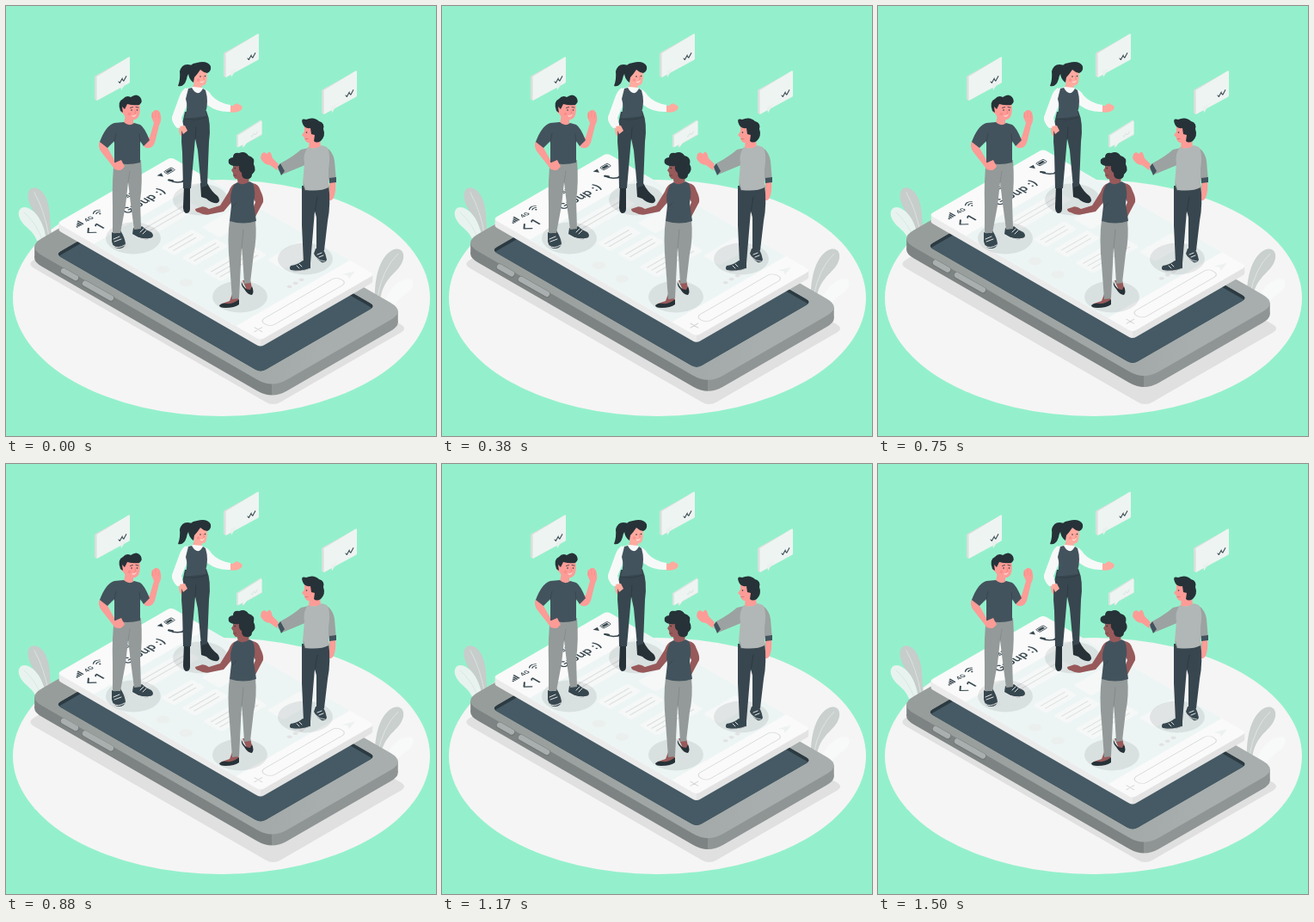
Recreate the animation shown at these times as an HTML page. Size 500 by 500 pixels, loop 1540 ms.

```html
<!DOCTYPE html>
<html lang="en">
<head>
<meta charset="utf-8">
<title>Group chat</title>
<style>
html, body { margin: 0; width: 100%; height: 100%; overflow: hidden; background: #94f0cc; }
svg { display: block; width: 100%; height: 100%; }
text { font-family: Inter, "Open Sans", sans-serif; fill: #37474f; }
.skin { fill: #fd9c97; }
.peach { fill: #ffaa9f; }
.brown { fill: #98595a; }
.top { fill: #43535d; }
.slacks { fill: #38464f; }
.grey { fill: #939a99; }
.pale { fill: #b1b7b6; }
.sleeve { fill: #9ca2a1; }
.ink { fill: #263238; }
.shoe { fill: #37474f; }
.white { fill: #f7f9f9; }
.line { fill: none; stroke-linecap: round; stroke-linejoin: round; }
</style>
</head>
<body>
<svg id="stage" viewBox="0 0 500 500" xmlns="http://www.w3.org/2000/svg"></svg>
<script>
const LOOP = 1540, RISE = 9.6;
const UX = 0.866, UY = 0.5;

// Rounded slab lying flat in isometric view; w runs up-right, l runs down-right.
function outline(x, y, w, l, r) {
  const at = (a, b) => (x + UX * (a + b)).toFixed(1) + ',' + (y + UY * (b - a)).toFixed(1);
  return `M${at(r, 0)}L${at(w - r, 0)}Q${at(w, 0)} ${at(w, r)}L${at(w, l - r)}Q${at(w, l)} ${at(w - r, l)}` +
    `L${at(r, l)}Q${at(0, l)} ${at(0, l - r)}L${at(0, r)}Q${at(0, 0)} ${at(r, 0)}Z`;
}

function slab(id, x, y, w, l, r, depth, face, left, right) {
  const d = outline(x, y, w, l, r), inset = r * 0.433;
  const x1 = x + inset, x2 = x + UX * (w + l) - inset;
  const y2 = y + UY * (l - w), split = (UX * l - inset) / (x2 - x1);
  return `<linearGradient id="${id}" gradientUnits="userSpaceOnUse" x1="${x1}" y1="0" x2="${x2}" y2="0">
      <stop offset="${split}" stop-color="${left}"/><stop offset="${split}" stop-color="${right}"/></linearGradient>
    <g fill="url(#${id})"><path d="${d}" transform="translate(0 ${depth})"/>
    <path d="M${x1},${y}L${x2},${y2}v${depth}L${x1},${y + depth}Z"/></g>
    <path d="${d}" fill="${face}"/>`;
}

const shape = (cls, d) => `<path class="${cls}" d="${d}"/>`;
const fill = (color, d) => `<path fill="${color}" d="${d}"/>`;
const stroke = (d, color, width) => `<path class="line" d="${d}" stroke="${color}" stroke-width="${width}"/>`;
const shade = (x, y) => `<ellipse cx="${x}" cy="${y}" rx="32" ry="18.5" fill="#263238" opacity=".1"/>`;
const eye = (x, y) => `<circle cx="${x}" cy="${y}" r=".8" class="ink"/>`;
const blush = (x, y) => `<circle cx="${x}" cy="${y}" r="1.7" fill="#f47c7b" opacity=".5"/>`;

function phone() {
  const screen = y => outline(57.5, y, 154.5, 275.5, 7);
  return `<linearGradient id="rim"><stop offset=".1" stop-color="#979d9b"/><stop offset=".8" stop-color="#a7aead"/></linearGradient>` +
    slab('body', 24.5, 280, 179, 329, 20, 13, 'url(#rim)', '#7d8382', '#8f9594') +
    `<clipPath id="hole"><path d="${screen(288.5)}"/></clipPath>
    <g clip-path="url(#hole)"><path d="${screen(288.5)}" fill="#2c3a42"/><path d="${screen(293)}" fill="#455a64"/></g>` +
    stroke('M67,308.5L81,316.5M92,323L122,340', '#727877', 8) +
    stroke('M67,308L81,316M92,322.5L122,339.5', '#a9afae', 6.4);
}

function bubble(a, b, w, h, lines) {
  let s = `<rect x="${a}" y="${b}" width="${w}" height="${h}" rx="3" fill="#f6f8f8"/>`;
  for (let i = 0; i < lines; i++) {
    s += stroke(`M${a + 5},${b + 6 + i * 6}h${w - (i === lines - 1 ? 12 : 10)}`, '#dfe1e1', 1.3);
  }
  return s;
}

function panel() {
  const ink = '#37474f';
  const bars = [0, 1, 2, 3].map(i =>
    `<rect x="${8 + i * 2.4}" y="${17 - i * 1.9}" width="1.7" height="${2 + i * 1.9}" fill="${ink}"/>`).join('');
  return slab('card', 59.5, 252.3, 153, 273, 5, 8, '#fafafa', '#ebebeb', '#e3e3e3') +
    `<g transform="matrix(${UX} ${-UY} ${UX} ${UY} 59.5 252.3)">
      <rect y="49" width="153" height="191" fill="#edf5f4"/>` +
      bars +
      `<text x="21" y="19" font-size="7" font-weight="600">4G</text>` +
      stroke('M35,13.5q4.5,-4 9,0M36.8,15.7q2.7,-2.2 5.4,0', ink, 1.1) +
      `<circle cx="39.5" cy="18" r="1" fill="${ink}"/>
      <text x="66" y="19" font-size="7.5" font-weight="600">12:45</text>
      <path d="M122,12h6l-3,5.5Z" fill="${ink}"/>
      <rect x="131" y="12" width="10" height="5.5" rx="1.2" fill="none" stroke="${ink}" stroke-width=".8"/>
      <rect x="132.2" y="13.2" width="7" height="3.1" fill="${ink}"/>` +
      stroke('M15,27l-5.5,5l5.5,5', ink, 1.6) +
      `<text x="21" y="37.5" font-size="14.5" font-weight="600">1</text>
      <text x="57" y="37" font-size="13.6" font-weight="600">Group :)</text>` +
      stroke('M125,25q0,10 11,12', ink, 2) + stroke('M125,25.5l1.5,2.5M133.5,36l2.5,1', ink, 3) +
      bubble(43, 59, 70, 19, 2) + bubble(41, 98, 42, 18, 2) + bubble(43, 124, 45, 18, 2) +
      bubble(42, 154, 62, 24, 3) + bubble(92, 102, 50, 24, 0) + bubble(98, 184, 44, 22, 0) +
      [70, 125, 156].map(b => `<circle cx="17" cy="${b}" r="6.5" fill="#ebf0ef"/>`).join('') +
      [82, 90, 98].map(a => `<circle cx="${a}" cy="230" r="2.4" fill="#e3e2e2"/>`).join('') +
      stroke('M6,259h10M11,254v10', '#d5d7d7', 1.2) +
      `<rect x="22" y="250" width="103" height="14" rx="6" fill="#fafafa" stroke="#d9dbdb"/>
      <path d="M131,251l13,5l-13,5l3,-5Z" fill="#edf2f1"/>
    </g>`;
}

function leaves() {
  return fill('#c6cdcb', 'M54,270C50,256 53,237 47,224C43,214 35,209 29,212C24,216 25,224 28,231C33,244 43,247 47,272Z') +
    stroke('M33,217Q45,238 50,268', '#e2e7e5', 0.8) +
    fill('#e8f3ef', 'M47,275C46,256 36,236 22,234C14,234 13,242 17,249C22,258 31,260 36,273Z') +
    stroke('M21,240Q35,252 42,271', '#cfe2db', 0.7) +
    fill('#f8f9f9', 'M440,345C446,327 458,317 470,317C477,320 473,330 466,334C456,340 454,346 450,350Z') +
    fill('#c9d0ce', 'M429,342C428,318 434,292 449,284C459,279 465,287 461,297C456,311 439,314 435,342Z') +
    stroke('M456,288Q438,305 432,338', '#e6e9e8', 0.8);
}

function speech(x, y, tail) {
  return `<g transform="translate(${x} ${y})">
    <path d="M0,23l2,-1.5L41,0l-1,30L3,51l-3,-1.5Z" fill="#d9dfdd"/>
    <path d="M2.5,23L39,.8q2,-1 2,1V29q0,1 -1,1.7L2.5,51Z" fill="#eef4f2"/>
    <path d="M0,-3L1,4L8,-7Z" fill="#eaf0ee" transform="translate(${tail} ${51 - tail * 0.53})"/>` +
    stroke('M28,29l1.3,1.5l3,-5.5M32.5,26.7l1.3,1.5l3,-5.5', '#37474f', 1.1) + '</g>';
}

function smallSpeech() {
  return fill('#d9e5e1', 'M268,150L296,132.5l1.5,1V150l-18,10l-4,5l-1,-3l-5,2.5l-1.5,-1Z') +
    fill('#eef4f2', 'M270,150.5L296,134q1.5,-.8 1.5,.8V149l-17.5,10l-4,5l-.5,-3l-5.5,3Z') +
    stroke('M285,151l1,1l2.5,-4M289,149l1,1l2.5,-4', '#d5dfdc', 0.8);
}

function waver() {
  return shape('skin', 'M158,155L161,164Q169,168 173,159L178,139Q182,132 179,124Q177,120 174,121Q169,122 169,129L172,136L167,153Z') +
    stroke('M171,130l-1,-6M174,129l0,-7M177,130l1,-6', '#f2817f', 0.5) +
    shape('shoe', 'M123,263Q128,266 133,261Q138,269 139,276Q138,282 131,282Q125,282 123,274Z') +
    shape('shoe', 'M148,258Q153,261 158,256Q163,261 169,263Q173,267 169,270Q161,273 154,269L147,265Z') +
    stroke('M125,271l7,-3M126,274l8,-3M156,263l4,-4M159,265l4,-4', '#f5f5f5', 0.9) +
    stroke('M125,279q5,4 13,-1M148,267q11,6 22,3', '#e6e8e8', 1) +
    shape('grey', 'M126,179L157,179Q159,206 156,226L157,259L149,260L145,230L142,205L139,232L133,264L124,264L124,232Q123,202 126,179Z') +
    stroke('M142,205l2,-13', '#7f8685', 0.7) +
    shape('skin', 'M139,126L148,129L148,138Q143,142 137,137Z') +
    shape('skin', 'M109,157Q106,163 111,170L122,184Q126,191 133,191Q138,189 137,184Q134,180 127,181L117,163Z') +
    shape('top', 'M137,135Q143,141 149,136L156,138Q161,141 167,156L160,163L156,157L156,182Q141,186 126,182L126,157L118,165L109,158Q116,139 126,136Z') +
    stroke('M126,158l2,-10M156,158l-1,-9', '#35434b', 0.8) +
    shape('skin', 'M125,183L134,179L138,187L132,191L126,190Z') +
    shape('skin', 'M136,115Q143,109 155,113Q157,123 154,129Q150,134 143,132Q138,129 136,125Q131,122 135,117Z') +
    shape('ink', 'M133,122Q129,111 136,108Q140,103 145,106Q152,101 156,106Q160,111 155,115Q148,116 141,114L138,120L135,117L136,124Z') +
    eye(146, 121) + eye(152.5, 121) + blush(143.5, 125.5) +
    stroke('M147,128q2.5,1 4,-1', '#fff', 0.8) + stroke('M144.5,118.5l3,-1M151,117.5l3,.6', '#263238', 0.8) +
    stroke('M150,121l1,3.5l-1.5,.3', '#e97575', 0.6);
}

function pointer() {
  return shape('peach', 'M258,116L264,116Q268,112 270,114L274,116Q276,119 272,122Q266,125 259,123Z') +
    shape('peach', 'M202,137L209,139Q213,145 214,152Q211,159 207,154Q201,151 201,143Z') +
    shape('ink', 'M207,208L214,208L214,236Q214,241 209,241Q206,239 206,234Z') +
    shape('ink', 'M226,206L234,206Q239,216 246,221Q250,226 246,229Q239,230 233,224L227,222Z') +
    shape('slacks', 'M208,123L233,122Q239,136 236,158L234,209L227,211L223,168L220,154L215,212L206,212L205,170Q202,145 208,123Z') +
    stroke('M220,155l1,-14', '#2b373e', 0.7) +
    shape('peach', 'M219,88L227,90L228,99L216,99Z') +
    shape('white', 'M209,95Q204,98 201,107L193,129Q192,135 199,142L207,141Q205,134 204,130L211,114Z') +
    shape('white', 'M229,96Q235,97 239,104Q247,113 261,115L261,123Q246,124 234,115Z') +
    shape('white', 'M209,96L218,94L228,95L234,100L232,112L210,112Z') +
    shape('top', 'M212,96L216,95Q223,107 229,96L232,98Q236,111 232,124L233,128L208,131Q212,117 209,108Z') +
    stroke('M208,131q14,3 25,-2', '#303d44', 1) +
    shape('peach', 'M202,140L208,139L211,145L206,149Z') +
    shape('ink', 'M216,69Q205,65 202,76Q203,85 200,93Q207,95 210,85Q211,77 216,78Z') +
    shape('peach', 'M217,75L233,73Q235,85 232,91Q226,95 220,91Q215,85 217,75Z') +
    shape('ink', 'M212,77Q212,67 222,66Q234,63 238,70Q239,76 234,78Q229,77 226,74Q222,80 219,83L218,89Q212,85 212,77Z') +
    eye(226, 82) + eye(231.5, 81.5) + blush(223.5, 86) +
    stroke('M226.5,88.5q2,1 3.5,-1', '#fff', 0.8) + stroke('M229.5,81.5l1,3.5l-1.2,.2', '#e97575', 0.6);
}

function listener() {
  return shape('brown', 'M268,206Q262,207 259,216L249,232L236,236Q230,232 226,234L220,236Q220,239 224,240Q231,244 238,242L253,239L264,226Z') +
    shape('brown', 'M287,206Q294,207 296,215Q300,223 299,228L290,245L284,245L290,228L286,220Z') +
    shape('brown', 'M263,335L270,335L271,347L250,349L251,346L260,343ZM275,319L284,319L287,332L282,335Z') +
    shape('ink', 'M248,348Q251,345 257,346Q264,347 271,341L271,347Q266,351 255,351Q248,351 248,348Z') +
    shape('ink', 'M274,321Q277,330 284,330L286,326Q289,333 286,336Q281,336 277,329Q273,325 274,321Z') +
    shape('grey', 'M260,249L290,248Q292,270 288,288L284,322L277,323L275,291L274,280L271,340L263,341L260,300Q257,270 260,249Z') +
    stroke('M274,282l2,-22', '#7f8685', 0.8) +
    shape('brown', 'M268,193L283,196L282,208L270,209Z') +
    shape('top', 'M269,205Q276,210 283,204L287,206Q291,216 288,229L291,250Q276,255 260,250L262,232Q259,220 265,208Z') +
    stroke('M263,234l5,-5', '#35434b', 0.8) +
    shape('brown', 'M264,181L276,181L279,196Q275,203 267,201Q264,199 264,194L262,191L264,188Z') +
    eye(266.3, 188.5) + stroke('M264.5,197h3', '#6f3c3e', 0.8) +
    shape('ink', 'M259,183Q257,177 264,176Q264,170 271,171Q278,168 282,174Q290,176 288,184Q292,191 286,196Q286,202 279,201Q274,201 274,194Q270,191 271,186Q263,187 259,183Z');
}

function speaker() {
  return shape('skin', 'M317,184L310,177L308,171Q305,168 304,172L300,170L297,172L296,177Q299,184 307,185L315,191Z') +
    shape('skin', 'M376,203L383,203Q384,216 381,223Q378,228 375,225Q374,220 376,214Z') +
    shape('shoe', 'M345,296L354,298L354,305Q346,309 333,308Q328,306 331,302Q339,301 345,296Z') +
    shape('shoe', 'M360,282L369,283Q372,289 373,295Q371,299 367,298Q361,294 358,288Z') +
    stroke('M338,302l3,3M341,300l3,3M362,289l5,-2M364,292l5,-2', '#f5f5f5', 0.9) +
    stroke('M331,307.5q12,2 22,-2M360,292q5,5 11,5', '#e6e8e8', 0.8) +
    shape('slacks', 'M344,209L375,207Q378,230 374,250L370,284L361,284L361,246L359,238L354,299L346,299L344,255Z') +
    stroke('M359,240l3,-18', '#2b373e', 0.8) +
    shape('skin', 'M353,152L365,153L366,165L352,166Z') +
    shape('sleeve', 'M352,165L350,184L321,196L316,190L319,183Q334,175 343,167Z') +
    shape('sleeve', 'M371,164Q380,168 382,180L384,204L376,205L372,187Z') +
    shape('pale', 'M351,164Q359,168 367,162L373,164Q378,170 375,190L375,211Q366,216 348,214L345,206L347,183Q345,172 351,164Z') +
    stroke('M346,207l2,7', '#8c9391', 0.8) +
    shape('top', 'M316,187L319,183L324,192L320,197ZM376,200L384,199L384,205L376,206Z') +
    shape('skin', 'M347,139L360,140L364,152Q359,160 351,159Q347,157 347,153L344,150L347,146Z') +
    eye(349.5, 147) + stroke('M348,154.5h3', '#d86e6e', 0.8) +
    shape('ink', 'M345,137Q342,130 349,132Q358,128 364,134Q371,136 369,143Q372,151 366,157Q361,160 358,157L359,150L355,149L354,142Q347,143 345,137Z');
}

document.getElementById('stage').innerHTML =
  `<rect width="500" height="500" fill="#94f0cc"/>
  <ellipse cx="250.5" cy="339.5" rx="242.5" ry="137.5" fill="#f5f5f5"/>
  <path d="${outline(24, 300, 181, 331, 10)}" fill="#e0e0e0"/>` +
  leaves() + `<g id="device">${phone()}${panel()}</g>` +
  shade(148, 270) + shade(226, 225) + shade(272, 338) + shade(348, 294) +
  speech(103, 59, 30) + speech(253, 32, 8) + speech(367, 75, 11) + smallSpeech() +
  pointer() + waver() + speaker() + listener();

const device = document.getElementById('device');
function draw(now) {
  const lift = RISE * (1 - Math.cos(2 * Math.PI * (now % LOOP) / LOOP)) / 2;
  device.setAttribute('transform', `translate(0 ${(-lift).toFixed(2)})`);
}

const start = performance.now();
function tick() {
  draw(performance.now() - start);
  requestAnimationFrame(tick);
}
tick();
</script>
</body>
</html>
```
